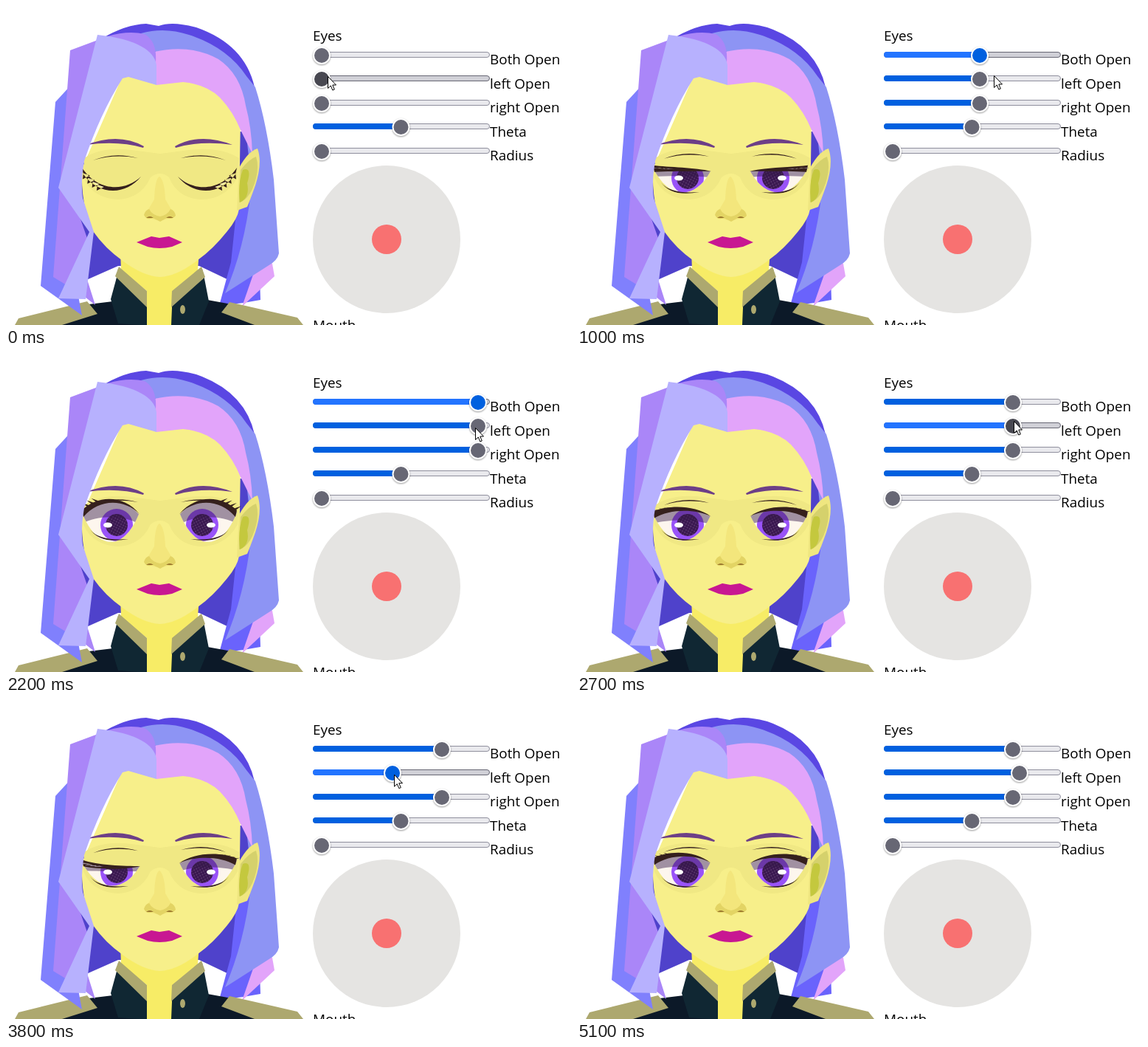
Recreate the animation shown at these times as an HTML page. Size 766 px wide and 432 px high, loop 5200 ms.

```html
<!DOCTYPE html>
<html lang="en">
<head>
<meta charset="utf-8">
<title>Eye controls</title>
<style>
html, body { margin: 0; width: 100%; height: 100%; overflow: hidden; background: #fff; }
svg { display: block; }
text { font: 18.9px "Open Sans", "Noto Sans", sans-serif; fill: #000; }
</style>
</head>
<body>
<svg width="766" height="432" viewBox="0 0 766 432">
  <defs>
    <pattern id="specks" width="3.6" height="3.6" patternUnits="userSpaceOnUse" patternTransform="rotate(28)">
      <rect width="4" height="4" fill="#3a1850"/><circle cx="1.8" cy="1.8" r=".6" fill="#8d6a9c"/>
    </pattern>
    <filter id="soft" x="-50%" y="-50%" width="200%" height="200%"><feGaussianBlur stdDeviation="1.2"/></filter>
  </defs>

  <g id="backHair">
    <path fill="#4f42cb" d="M95 230 130 170H332V230L306 348 304 372 262 352H152L109 371 95 300Z"/>
    <path fill="#5a47e3" d="M130 44Q162 25 190 24L207 27Q225 20 258 29Q324 52 337 110L300 130 160 100Z"/>
    <path fill="#6a63fc" d="M314 262 340 240 345 398 322 402 289 406 305 347Z"/>
    <path fill="#e2a4fa" d="M345 335 361 349 364 366 320 407Z"/>
  </g>

  <g id="uniform">
    <path fill="#0c1928" d="M66 432 112 404 145 400 152 356 190 386H226L266 356 273 398 306 404 350 432Z"/>
    <path fill="#102733" d="M151 364 142 397 152 430 180 432H191V400ZM268 364 275 400 262 432H224V402Z"/>
    <path fill="#f7ec66" d="M155 330H262L260 358 226 386 224 432H191L191 386 156 358Z"/>
    <g fill="#ada86f">
      <path d="M153 353 191 386V408L148 366ZM265 353 225 386 224 408 270 367ZM17 423 110 400 124 417 76 432H12ZM303 401 395 422 403 432H337L292 415Z"/>
      <ellipse cx="239.500" cy="411" rx="3.500" ry="6"/>
    </g>
  </g>

  <g id="face">
    <path fill="#f7ef8a" d="M160 90 204 100 290 100 318 150 316 275Q314 288 300 305Q280 330 260 344Q232 366 209 367Q186 366 158 345Q134 328 118 305Q101 270 103 220Z"/>
    <path fill="#f0e884" d="M106 206Q130 190 170 195L209 200 248 195Q290 190 316 206L314 232Q298 262 264 262Q232 260 221 232Q209 222 196 232Q184 260 152 262Q116 260 105 232Z"/>
    <path fill="#f3e67c" d="M208 231Q202 234 201 262L188 284Q208 296 229 284L216 262Q215 236 208 231Z"/>
    <path fill="#e3d464" d="M187 283Q189 276 194 275Q198 283 209 285Q219 283 223 275Q229 277 230 284Q225 290 218 287L209 292 199 287Q191 291 187 283Z"/>
    <path fill="#99752d" d="M190 287Q195 283 200 287ZM217 287Q222 283 227 287Z"/>
    <path fill="#c81792" d="M177 320 197 312 208 314 221 312 239 320 225 326Q208 330 192 326Z"/>
    <path id="brow" fill="#6d3f87" d="M229 190Q263 171 307 188Q264 182 230 192Z"/>
    <use href="#brow" transform="translate(416 0) scale(-1 1)"/>
  </g>

  <g id="leftEye"></g>

  <g id="sideHair">
    <path fill="#8d94f4" d="M183 37Q215 28 248 39Q300 56 326 95L338 110Q354 160 363 235L370 335Q368 345 355 352L297 389Q326 322 333 240L322 140 290 80 203 62Z"/>
    <path fill="#e2a4fa" d="M201 62Q250 51 288 72Q318 92 325 135Q333 165 334 200L318 168Q308 143 290 124Q272 106 240 103L204 107Z"/>
    <path fill="#efe680" d="M316 219Q328 197 341 193Q348 212 338 243Q329 268 327 272L313 277Z"/>
    <path fill="#d5d16c" d="M318 222Q330 207 339 204Q345 222 334 248Q326 264 316 266Z"/>
    <path fill="#c4c83e" d="M321 222Q334 217 327 240Q331 260 317 266Q314 240 321 222Z"/>
    <path fill="#8080fd" d="M67 130 90 105 88 340 103 419 47 379Z"/>
    <path fill="#aa86f8" d="M87 60 138 41Q165 33 188 38Q205 48 203 76L140 80 84 240 112 320 108 364 121 405 102 390 64 367Z"/>
    <path fill="#b7b1fe" d="M124 39Q163 43 184 55Q202 65 204 80V107L166 96 158 98Q128 145 106 210Q101 240 104 260L119 306 108 397 71 396 113 306 71 246Z"/>
  </g>

  <g id="rightEye" transform="translate(416 0) scale(-1 1)"></g>

  <circle cx="516" cy="316" r="100" fill="#e5e4e2"/>
  <circle cx="516" cy="316" r="20" fill="#f87171"/>
  <text x="416" y="47">Eyes</text>
  <text x="416" y="439">Mouth</text>
  <g id="sliders"></g>
  <path id="cursor" fill="#fff" stroke="#000" d="M.5 .5V16.500L4.300 13 6.800 19 9.300 18 6.800 12H11.500Z"/>
</svg>

<script>
const LOOP = 5200, STEP = 100;
const labels = ["Both Open", "left Open", "right Open", "Theta", "Radius"];
const $ = id => document.getElementById(id);

const bothKeys = [[600, 428], [1000, 546], [1500, 610], [1800, 642], [2200, 640], [2700, 591]];
const leftKeys = [...bothKeys, [3100, 591], [3300, 584], [3700, 500], [4000, 572], [4200, 600]];
const cursorKeys = [
  [0, 436, 95], [300, 432, 70], [600, 432, 70], [1000, 565, 94], [1500, 611, 100],
  [1800, 643, 102], [2200, 636, 101], [2700, 592, 92], [3100, 592, 97], [3300, 586, 97],
  [3700, 502, 99], [4000, 574, 104], [4200, 600, 107], [4400, 603, 104], [4700, 690, -25]
];
// [end time, slider row, pressed]
const pointerStates = [
  [200, 1, false], [600, 0, false], [2700, 0, true],
  [3100, 1, false], [4250, 1, true], [4450, 1, false]
];

function track(keys, t, column = 1) {
  const next = keys.findIndex(k => k[0] > t);
  if (next === 0) return keys[0][column];
  if (next < 0) return keys[keys.length - 1][column];
  const a = keys[next - 1], b = keys[next];
  return a[column] + (b[column] - a[column]) * (t - a[0]) / (b[0] - a[0]);
}

// Cubic arc whose middle passes through height mid
function arc(x0, y0, x1, y1, mid) {
  const c = (8 * mid - y0 - y1) / 6, w = x1 - x0;
  return `C${x0 + w * .27} ${c} ${x0 + w * .73} ${c} ${x1} ${y1}`;
}

function eye(id, open) {
  const x0 = 103, y0 = 222 - 6 * open, x1 = 182 - 2 * open, y1 = 231 - 13 * open;
  const lid = 247 - 48 * open, low = 248 + 8 * open, shade = 240 - 18 * open;
  const lidArc = arc(x0, y0, x1, y1, lid);
  const control = (8 * lid - y0 - y1) / 6;
  let lashes = "";
  for (const u of [.05, .13, .21, .29]) {
    const x = x0 + (x1 - x0) * u;
    const y = y0 * (1 - u) ** 3 + 3 * control * u * (1 - u) + y1 * u ** 3;
    lashes += `M${x - 2} ${y}l${-1 - 7 * open} ${8 - 14 * open}L${x + 7} ${y + 3 - 3 * open}Z`;
  }
  const foldY = 208 - 4 * open;
  return `
    <clipPath id="${id}"><path d="M${x0} ${y0}${lidArc}${arc(x1, y1, x0, y0, low)}Z"/></clipPath>
    <g clip-path="url(#${id})">
      <rect x="100" y="190" width="85" height="70" fill="#fdf6ee"/>
      <circle cx="150" cy="233" r="22" fill="#9953f8"/>
      <circle cx="150" cy="233" r="15" fill="url(#specks)"/>
      <path fill="#351848" fill-opacity=".46" d="M100 185H185V234L181 232${arc(181, 232, 103, 231, shade)}Z"/>
      <ellipse cx="138" cy="233" rx="6" ry="3.500" fill="#fff"/>
    </g>
    <g fill="#35201d">
      <path d="M${x0} ${y0 - 3}${arc(x0, y0 - 3, x1 + 1, y1, lid - 2)}${arc(x1 + 1, y1, x0 + 2, y0 + 6, lid + 3)}Z${lashes}"/>
      <path d="M118 ${foldY + 1}Q147 ${foldY - 11} 179 ${foldY - 2}Q147 ${foldY - 8} 118 ${foldY + 1}Z"/>
      ${open > .15 ? '<path d="M114 239Q126 255 166 252Q128 259 114 239Z"/>' : ""}
    </g>`;
}

function slider(row, x, state) {
  const y = Math.floor(66 + 32.5 * row), textY = Math.round(79 + 32.5 * row);
  const hot = state && state[1] === row, pressed = hot && state[2];
  const thumb = pressed ? "#0060df" : hot ? "#484851" : "#676774";
  return `
    <rect x="416.5" y="${y - 3.5}" width="239" height="7" rx="3.5"
      fill="${hot ? "#d0d0d7" : "#e9e9ed"}" stroke="${hot ? "#676774" : "#8f8f9d"}"/>
    ${x > 428 ? `<rect x="416" y="${y - 4}" width="${x - 416}" height="8" rx="4" fill="${hot ? "#2374ff" : "#0060df"}"/>` : ""}
    <circle cx="${x}" cy="${y + 2}" r="12" opacity=".4" filter="url(#soft)"/>
    <circle cx="${x}" cy="${y + 1}" r="11" fill="${thumb}" stroke="#fff" stroke-width="2"/>
    <text x="656" y="${textY}">${labels[row]}</text>`;
}

function draw(now) {
  const t = Math.floor(now % LOOP / STEP) * STEP;
  const both = track(bothKeys, t), left = track(leftKeys, t);
  const state = pointerStates.find(s => t < s[0]);
  const openness = x => (x - 428) / 216;
  $("leftEye").innerHTML = eye("leftLid", openness(left));
  $("rightEye").innerHTML = eye("rightLid", openness(both));
  $("sliders").innerHTML = [both, left, both, 535.5, 428].map((x, row) => slider(row, x, state)).join("");
  $("cursor").setAttribute("transform", `translate(${track(cursorKeys, t)} ${track(cursorKeys, t, 2)})`);
  requestAnimationFrame(draw);
}
draw(performance.now());
</script>
</body>
</html>
```
